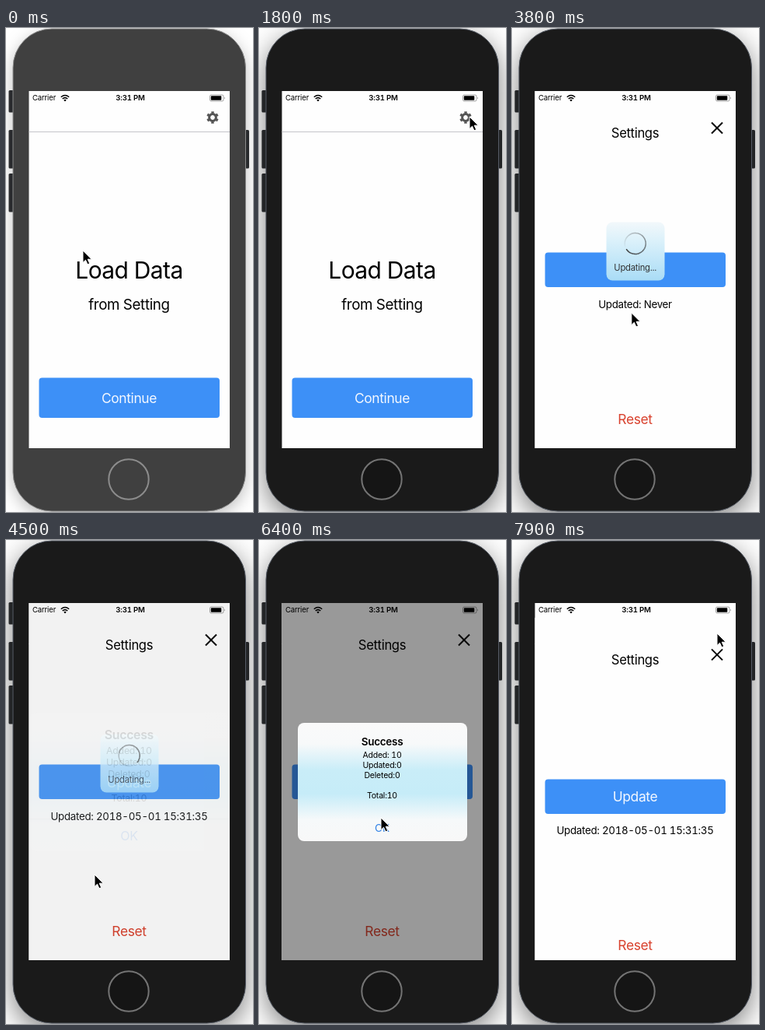
Animation of 318 by 622 pixels, one loop 8000 ms. Source, as an HTML page:

```html
<!DOCTYPE html>
<html lang="en">
<head>
<meta charset="utf-8">
<title>Load data demo</title>
<style>
  html, body { margin: 0; height: 100%; overflow: hidden; background: #fff; }
  svg { display: block; width: 100vw; height: 100vh; }
  text { font-family: Inter, Roboto, "Liberation Sans", sans-serif; letter-spacing: -.02em;
         font-variant-numeric: tabular-nums; text-anchor: middle; }
  .case { fill: #404040; stroke: #8c8c8c; filter: drop-shadow(0 6px 10px rgba(0, 0, 0, .25)); }
  .home { fill: none; stroke: #8c8c8c; stroke-width: 2; }
  .keys { fill: #2e3033; }
  .active .case { fill: #1a1a1a; stroke: #565c66; filter: drop-shadow(0 10px 17px rgba(0, 0, 0, .5)); }
  .active .home { fill: #151515; stroke: #747474; }
  .blue { fill: #3d90f7; }
  .light { fill: #f4f8ff; }
  .big { font-size: 17.4px; }
  .small { font-size: 13.3px; }
  .line { fill: none; stroke: #000; }
</style>
</head>
<body>
<svg viewBox="0 0 318 622" preserveAspectRatio="none">
  <defs>
    <clipPath id="screen"><rect x="29.5" y="81" width="258.5" height="459"/></clipPath>
    <linearGradient id="glass" x1="0" y1="0" x2="0" y2="1">
      <stop offset="0" stop-color="#fafafa"/>
      <stop offset=".18" stop-color="#f7f9fa"/>
      <stop offset=".4" stop-color="#c9edf8"/>
      <stop offset=".6" stop-color="#c6ecf8"/>
      <stop offset=".82" stop-color="#f6f9fa"/>
      <stop offset="1" stop-color="#f8f8f8"/>
    </linearGradient>
    <linearGradient id="hudGlass" x1="0" y1="0" x2="0" y2="1">
      <stop offset="0" stop-color="#f2f8fb"/>
      <stop offset=".35" stop-color="#d9f0fa"/>
      <stop offset="1" stop-color="#a9dcf6"/>
    </linearGradient>
  </defs>

  <g id="phone">
    <g class="keys">
      <rect x="3.5" y="80" width="8" height="28.5" rx="1.5"/>
      <rect x="3.5" y="131" width="8" height="49.5" rx="1.5"/>
      <rect x="3.5" y="187" width="8" height="49.5" rx="1.5"/>
      <rect x="305" y="131" width="8" height="49.5" rx="1.5"/>
    </g>
    <rect class="case" x="9" y="1" width="299.5" height="620" rx="50"/>
    <circle class="home" cx="158" cy="580" r="25.7"/>
  </g>

  <g clip-path="url(#screen)">
    <rect x="29" y="81" width="260" height="460" fill="#fefefe"/>
    <path d="M29 133.5h260" stroke="#c4c4ca"/>
    <g transform="translate(266 115)" fill="none" stroke="#555">
      <circle r="4.4" stroke-width="3"/>
      <circle r="6.3" stroke-width="3" pathLength="12" stroke-dasharray="1 1" transform="rotate(15)"/>
    </g>
    <text x="158.5" y="321.5" font-size="30">Load Data</text>
    <text x="158.5" y="362" font-size="18.8">from Setting</text>
    <rect class="blue" x="42.5" y="449.5" width="232.5" height="51.5" rx="4"/>
    <text class="big light" x="158.5" y="482">Continue</text>

    <g id="settings">
      <rect x="29" y="81" width="260" height="460" fill="#fefefe"/>
      <text x="158.5" y="141" font-size="16.6">Settings</text>
      <path class="line" d="M257 121.500l14 14m0-14l-14 14" stroke-width="2"/>
      <rect class="blue" x="42.500" y="288.500" width="232.500" height="44.500" rx="4"/>
      <text class="big light" x="158.500" y="317.500">Update</text>
      <text class="small" id="stamp" x="158.500" y="359.500"></text>
      <text class="big" x="158.500" y="508.500" fill="#d9432f">Reset</text>
    </g>

    <g font-size="9.6">
      <text x="34" y="93.300" style="text-anchor:start">Carrier</text>
      <text x="160" y="93.300" font-weight="600">3:31 PM</text>
      <path class="line" d="M70.800 88.700q5.200-4.400 10.400 0M72.700 91q3.300-2.800 6.600 0" stroke-width="1.500"/>
      <path d="M74.300 92.500q1.700-1.300 3.400 0l-1.700 1.900z"/>
      <rect class="line" x="262.500" y="86" width="17.500" height="8" rx="1.800" stroke-width=".6" opacity=".6"/>
      <rect x="263.800" y="87.200" width="13.500" height="5.600" rx=".8"/>
      <path d="M281.300 88.700q1.600 1.300 0 2.600z" opacity=".6"/>
    </g>

    <rect id="dim" x="29" y="81" width="260" height="460"/>

    <g id="hud">
      <rect x="121.500" y="249.500" width="75" height="75" rx="8" fill="url(#hudGlass)"/>
      <g id="spinner" fill="none" stroke="#333" stroke-width="1.500"></g>
      <text x="158.700" y="311.800" font-size="11.200" fill="#333">Updating...</text>
    </g>

    <g id="alert">
      <rect x="50" y="235" width="218" height="152" rx="8" fill="url(#glass)"/>
      <path id="rule" d="M50 351.500h218" stroke="#b5c3cb" stroke-width=".7"/>
      <text x="158.500" y="264" font-size="13.500" font-weight="600">Success</text>
      <g font-size="10.500">
        <text x="158.500" y="280">Added: 10</text>
        <text x="158.500" y="293">Updated:0</text>
        <text x="158.500" y="306">Deleted:0</text>
        <text x="158.500" y="332">Total:10</text>
      </g>
      <text x="158.500" y="374.500" font-size="13.600" fill="#2f80e6">OK</text>
    </g>
  </g>

  <path id="cursor" d="M0 0v15.500l3.500-3.300 2.500 5.600 2.700-1.200-2.500-5.400h5z" stroke="#fff" stroke-linejoin="round"/>
</svg>

<script>
const LOOP = 8000, STEP = 100;
const $ = id => document.getElementById(id);
const clamp = v => Math.min(1, Math.max(0, v));
const smooth = p => p * p * p * (p * (6 * p - 15) + 10);
const ramp = (t, start, length) => smooth(clamp((t - start) / length));

// time, x, y of the pointer tip
const path = [
  [0, 99, 286], [200, 99, 286], [1250, 271, 114], [2200, 271, 114],
  [2900, 177, 329], [3500, 177, 329], [4200, 114, 430], [5300, 114, 430],
  [6200, 157, 357], [7200, 157, 357], [7600, 268, 98], [7700, 264, 120], [8000, 264, 120]
];

function pointer(t) {
  const i = path.findIndex(k => k[0] > t);
  const [t0, x0, y0] = path[i - 1], [t1, x1, y1] = path[i];
  const e = smooth((t - t0) / (t1 - t0));
  return [x0 + (x1 - x0) * e, y0 + (y1 - y0) * e];
}

// ring of short arcs whose opacity fades towards the tail
const PARTS = 36;
for (let i = 0; i < PARTS; i++) {
  const arc = document.createElementNS("http://www.w3.org/2000/svg", "circle");
  const attrs = { r: 13.5, pathLength: PARTS, "stroke-dasharray": `1.05 ${PARTS}`,
                  transform: `rotate(${i * 360 / PARTS})`, opacity: i / PARTS };
  for (const name in attrs) arc.setAttribute(name, attrs[name]);
  $("spinner").append(arc);
}

function draw(t) {
  $("phone").setAttribute("class", t >= 1500 ? "active" : "");

  const slide = 1 - ramp(t, 1850, 500) + ramp(t, 7812, 500);
  $("settings").setAttribute("transform", `translate(0 ${459 * slide})`);
  $("stamp").textContent = "Updated: " + (t < 4400 ? "Never" : "2018-05-01 15:31:35");

  const shown = ramp(t, 4400, 380), left = 1 - ramp(t, 6450, 350);
  const scale = 1.2 - .2 * shown;
  $("dim").setAttribute("opacity", .4 * shown * left);
  $("alert").setAttribute("opacity", shown * left);
  $("alert").setAttribute("transform", `translate(159 311) scale(${scale}) translate(-159 -311)`);
  $("rule").setAttribute("opacity", t < 6400 ? 1 : 0);

  $("hud").setAttribute("opacity", ramp(t, 3150, 150) * (1 - ramp(t, 4450, 160)));
  $("spinner").setAttribute("transform", `translate(158.7 277) rotate(${(t - 4500) * .36 + 40})`);

  $("cursor").setAttribute("transform", `translate(${pointer(t)})`);
}

function tick(now) {
  draw(Math.floor(now % LOOP / STEP) * STEP);
  requestAnimationFrame(tick);
}
draw(0);
requestAnimationFrame(tick);
</script>
</body>
</html>
```
